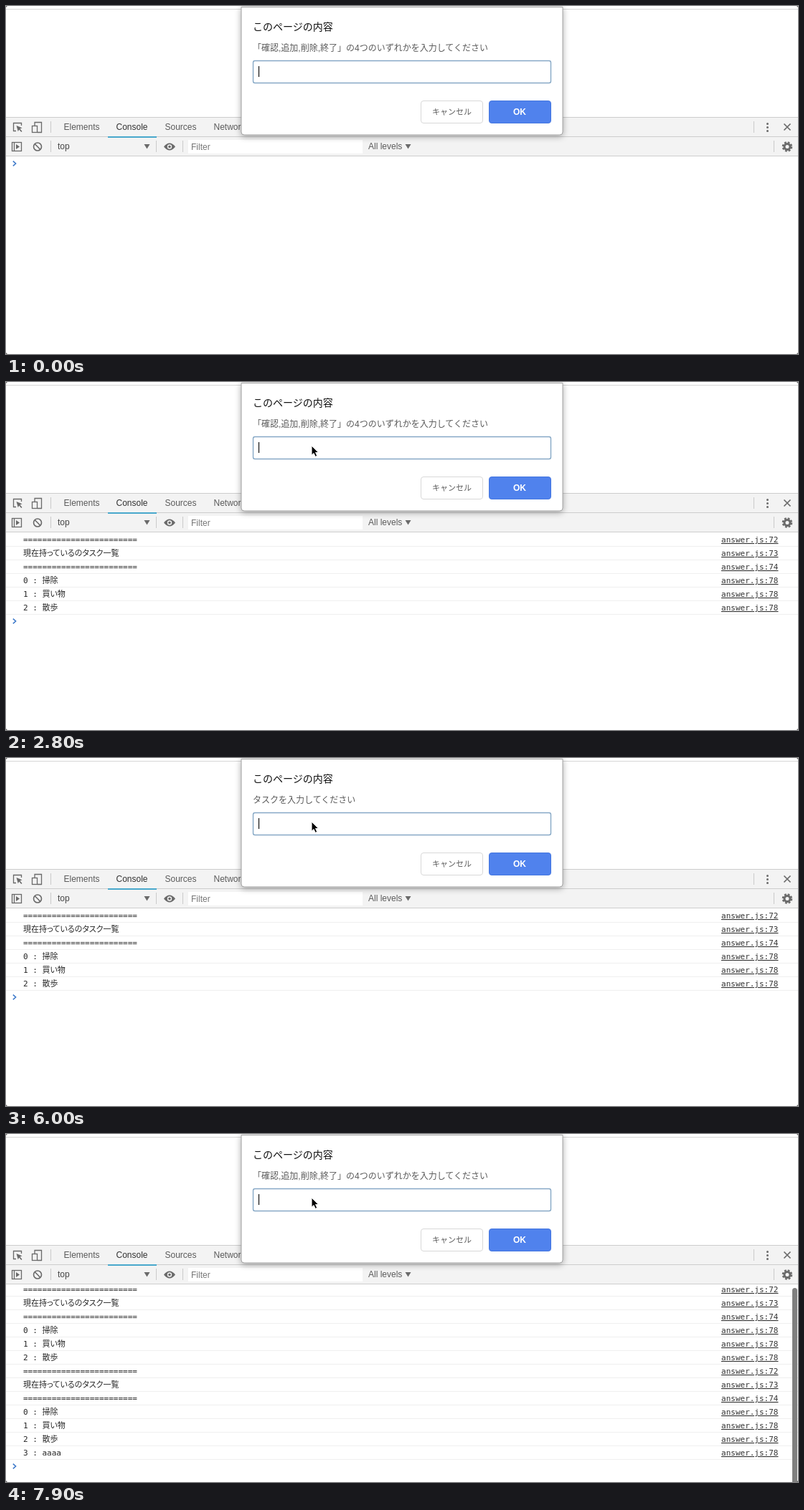
Write an HTML page that moves like this. It is 1104 by 486 pixels and loops after 8 s.

```html
<!DOCTYPE html>
<html lang="ja">
<head>
<meta charset="utf-8">
<title>Task prompt</title>
<style>
  html, body { margin: 0; width: 100%; height: 100%; overflow: hidden; background: #fff; }
  svg { display: block; }
  text { font: 12px 'Liberation Sans', 'Noto Sans CJK JP', 'Noto Sans CJK', sans-serif; fill: #5a5a5a; white-space: pre; }
  #log text { font: 11px 'DejaVu Sans Mono', 'Noto Sans CJK JP', 'Noto Sans CJK', monospace; font-feature-settings: 'palt'; fill: #262626; }
  #log .link { text-anchor: end; text-decoration: underline; fill: #333; }
  .icon { fill: none; stroke: #6a6a6a; stroke-width: 1.3; }
  .solid { fill: #6a6a6a; }
  .ok { fill: #5082ed; stroke: #4476e0; }
  .okText { fill: #fff; font-weight: bold; text-anchor: middle; }
  .pointer { stroke: #fff; stroke-linejoin: round; }
</style>
</head>
<body>
<svg id="stage" width="1104" height="486" viewBox="0 0 1104 486">
  <defs>
    <clipPath id="consoleArea"><rect y="210" width="1104" height="276"/></clipPath>
  </defs>
  <rect width="1104" height="486" fill="#fff"/>
  <path d="M0 4.5H1104" stroke="#d6d6d6"/>

  <g id="log" clip-path="url(#consoleArea)">
    <g id="rows"></g>
    <path id="chevron" d="M9.8 -3.4L13.6 0L9.8 3.4" fill="none" stroke="#3b78c9" stroke-width="1.5"/>
    <rect id="scrollbar" x="1096" y="215" width="7" height="290" rx="3.5" fill="#7f7f7f"/>
  </g>

  <rect y="155" width="1104" height="55" fill="#f3f3f3"/>
  <path d="M0 155.5H1104M0 182.5H1104M0 209.5H1104" stroke="#cdcdcd"/>
  <path d="M62.5 161V177M1042.5 161V177M62.5 188V204M209.5 188V204M246.5 188V204M1070.5 188V204" stroke="#cacaca"/>
  <rect x="142" y="182" width="68" height="2" fill="#48a8cc"/>
  <g id="tabs"></g>

  <g class="icon">
    <path d="M14 174.5H10.5V163.5H21.5V167"/>
    <path d="M40 167V162.5H49.5V176.5H44"/>
    <rect x="36.5" y="167.500" width="7" height="9"/>
    <rect x="8.500" y="190.500" width="13" height="12"/>
    <path d="M11.500 190.500V202.500"/>
    <circle cx="44" cy="196.500" r="5.500" stroke-width="1.600"/>
    <path d="M40.300 192.800L47.700 200.200" stroke-width="1.600"/>
    <path d="M1084.500 164.500L1093.500 173.500M1093.500 164.500L1084.500 173.500" stroke-width="1.700"/>
    <circle cx="1089" cy="196.500" r="4" stroke-width="3"/>
    <circle cx="1089" cy="196.500" r="6.200" stroke-width="2.200" stroke-dasharray="2.800 2.070"/>
  </g>
  <g class="solid">
    <path d="M14.500 167L22.500 170.300L19.500 171.500L22.500 175L21.200 176L18.300 172.600L16.800 175.200Z"/>
    <path d="M14 193V200L19 196.500Z"/>
    <path d="M192.500 193H200.500L196.500 199.500ZM556.500 193H564.500L560.500 199.500Z"/>
    <path d="M220 196.500Q228 186.500 236 196.500Q228 206.500 220 196.500Z"/>
    <circle cx="1061.500" cy="164.500" r="1.500"/>
    <circle cx="1061.500" cy="169.500" r="1.500"/>
    <circle cx="1061.500" cy="174.500" r="1.500"/>
  </g>
  <circle cx="228" cy="196.500" r="3.200" fill="#f3f3f3"/>
  <circle cx="228" cy="196.500" r="1.800" fill="#6a6a6a"/>
  <rect x="254" y="187" width="243" height="19" fill="#fff"/>
  <text x="72" y="200" style="fill:#444">top</text>
  <text x="258" y="201" style="fill:#777">Filter</text>
  <text x="505" y="200">All levels</text>

  <g id="dialog">
    <path id="panel" fill="#fff" stroke="#a4a4a4" style="filter:drop-shadow(0 2px 4px rgba(0,0,0,.33))"/>
    <text x="344" y="33.500" style="font-size:14px;fill:#111">このページの内容</text>
    <text id="message" x="344" y="62.500"></text>
    <g id="promptParts">
      <rect x="344.500" y="76.500" width="415" height="31" rx="2.500" fill="#fff" stroke="#86a8c6" stroke-width="1.400"/>
      <text id="entry" x="352" y="96" style="fill:#111"></text>
      <path id="underline" stroke="#222"/>
      <path id="caret" stroke="#111" stroke-width="1.200"/>
      <rect x="578.500" y="132.500" width="86" height="31" rx="3.500" fill="#fff" stroke="#d8d8d8"/>
      <text x="621.500" y="152" style="font-size:11px;font-weight:500;text-anchor:middle">キャンセル</text>
      <rect class="ok" x="673.500" y="132.500" width="86" height="31" rx="3.500"/>
      <text class="okText" x="716" y="152">OK</text>
    </g>
    <g id="alertParts">
      <rect class="ok" x="696.500" y="84.500" width="63" height="31" rx="3.500"/>
      <text class="okText" x="728" y="104">OK</text>
    </g>
  </g>

  <g id="mouse">
    <path id="arrow" class="pointer" d="M0 0V13.200L3 10.500L5.200 15.300L7.700 14.200L5.500 9.500H9.600Z" stroke-width="1"/>
    <g id="beam" fill="none">
      <path d="M-4 -7Q0 -7 0 -4V4Q0 7 -4 7M4 -7Q0 -7 0 -4V4Q0 7 4 7M-2 1H2" stroke="#fff" stroke-width="3"/>
      <path d="M-4 -7Q0 -7 0 -4V4Q0 7 -4 7M4 -7Q0 -7 0 -4V4Q0 7 4 7M-2 1H2" stroke="#111" stroke-width="1.300"/>
    </g>
  </g>
  <path d="M0 0H2L0 2ZM1104 0H1102L1104 2ZM0 486H2L0 484ZM1104 486H1102L1104 484Z" fill="#666"/>
</svg>
<script>
const LOOP = 8000, STEP = 100, BLINK = 500;
const $ = id => document.getElementById(id);
const show = (id, on) => $(id).setAttribute('visibility', on ? 'inherit' : 'hidden');

function add(parent, tag, attrs, text = '') {
  const node = document.createElementNS('http://www.w3.org/2000/svg', tag);
  for (const key in attrs) node.setAttribute(key, attrs[key]);
  node.textContent = text;
  parent.append(node);
  return node;
}

const tabs = { Elements: 80.5, Console: 153.5, Sources: 221.5, Network: 289.5, Performance: 358.5,
  Memory: 451.5, Application: 519.5, Security: 603.5, Audits: 670.5, Redux: 728.5 };
for (const name in tabs) {
  add($('tabs'), 'text', { x: tabs[name], y: 173, style: name === 'Console' ? 'fill:#333' : '' }, name);
}

const rule = '='.repeat(24);
const listing = tasks => [[rule, 72], ['現在持っているのタスク一覧', 73], [rule, 74],
  ...tasks.map((task, i) => [`${i} : ${task}`, 78])];
const tasks = ['掃除', '買い物', '散歩'];
const rows = [...listing(tasks), ...listing([...tasks, 'aaaa'])].map(([label, line], i) => {
  const row = add($('rows'), 'g', { transform: `translate(0 ${i * 19})` });
  add(row, 'text', { x: 24, y: 224 }, label);
  add(row, 'text', { x: 1076.5, y: 224, class: 'link' }, `answer.js:${line}`);
  add(row, 'path', { d: 'M0 229.5H1104', stroke: '#efefef' });
  return row;
});

const messages = {
  menu: '「確認,追加,削除,終了」の4つのいずれかを入力してください',
  task: 'タスクを入力してください',
  done: '新しいタスクを追加しました。'
};
const dialogs = [[0, 'menu'], [2600, ''], [2800, 'menu'], [5900, ''], [6000, 'task'],
  [7000, ''], [7200, 'done'], [7700, ''], [7900, 'menu']];
const logSizes = [[0, 0], [2700, 6], [7800, 13]];

// Each entry: time, text, thickness of the composition underline.
const typing = (start, words, mark) => words.split(' ').map((word, i) => [start + i * STEP, word, mark]);
const entries = [
  [-200, '', 0],
  ...typing(1500, 'k か かk かく かくn かくに かくにn かくにん', 1), [2300, '確認', 2], [2400, '確認', 0],
  [2800, '', 0], [3500, '\u3000', 0], [4200, '', 0],
  ...typing(4500, 't つ つい', 1), [4900, 'ついk', 1], [5100, 'ついか', 1], [5400, '追加', 2], [5700, '追加', 0],
  [6000, '', 0], ...typing(6500, 'a aa aaa aaaa', 0), [7900, '', 0]
];
const path = [[100, 181, 265], [500, 471, 80], [800, 426, 89]];

const latest = (list, t) => list.filter(item => item[0] <= t).pop();

function mouseAt(t) {
  const i = path.findIndex(key => key[0] > t);
  if (i < 1) return path[i < 0 ? path.length - 1 : 0].slice(1);
  const [t0, x0, y0] = path[i - 1], [t1, x1, y1] = path[i];
  const p = (t - t0) / (t1 - t0), ease = p * p * (3 - 2 * p);
  return [x0 + (x1 - x0) * ease, y0 + (y1 - y0) * ease];
}

function drawDialog(t) {
  const kind = latest(dialogs, t)[1], isAlert = kind === 'done';
  show('dialog', kind);
  if (!kind) return;
  $('panel').setAttribute('d', `M328 1.5H776V${isAlert ? 128 : 176}q0 4 -4 4H332q-4 0 -4 -4Z`);
  $('message').textContent = messages[kind];
  show('promptParts', !isAlert);
  show('alertParts', isAlert);

  const [since, text, mark] = latest(entries, t);
  $('entry').textContent = text;
  const end = 352 + (text ? $('entry').getComputedTextLength() : 0);
  $('underline').setAttribute('d', `M352 100.5H${end}`);
  $('underline').setAttribute('stroke-width', mark);
  $('caret').setAttribute('d', `M${end + .5} 84V99`);
  show('caret', !isAlert && Math.floor((t - since) / BLINK) % 2 === 0);
  if (isAlert) show('caret', false);
}

function drawLog(t) {
  const count = latest(logSizes, t)[1], scroll = count > 6 ? 3 : 0;
  rows.forEach((row, i) => row.setAttribute('visibility', i < count ? 'inherit' : 'hidden'));
  $('rows').setAttribute('transform', `translate(0 ${-scroll})`);
  $('chevron').setAttribute('transform', `translate(0 ${220 + count * 19 - scroll})`);
  show('scrollbar', scroll);
}

function drawMouse(t) {
  const [x, y] = mouseAt(t);
  const isBeam = t < 2400 && x > 344 && y > 76 && y < 108;
  $('mouse').setAttribute('transform', `translate(${x} ${y})`);
  show('mouse', t >= 100);
  show('beam', isBeam);
  show('arrow', !isBeam);
}

function draw(now) {
  const t = Math.floor(now % LOOP / STEP) * STEP;
  drawDialog(t);
  drawLog(t);
  drawMouse(t);
}

const start = performance.now();
function tick() {
  draw(performance.now() - start);
  requestAnimationFrame(tick);
}
tick();
</script>
</body>
</html>
```
